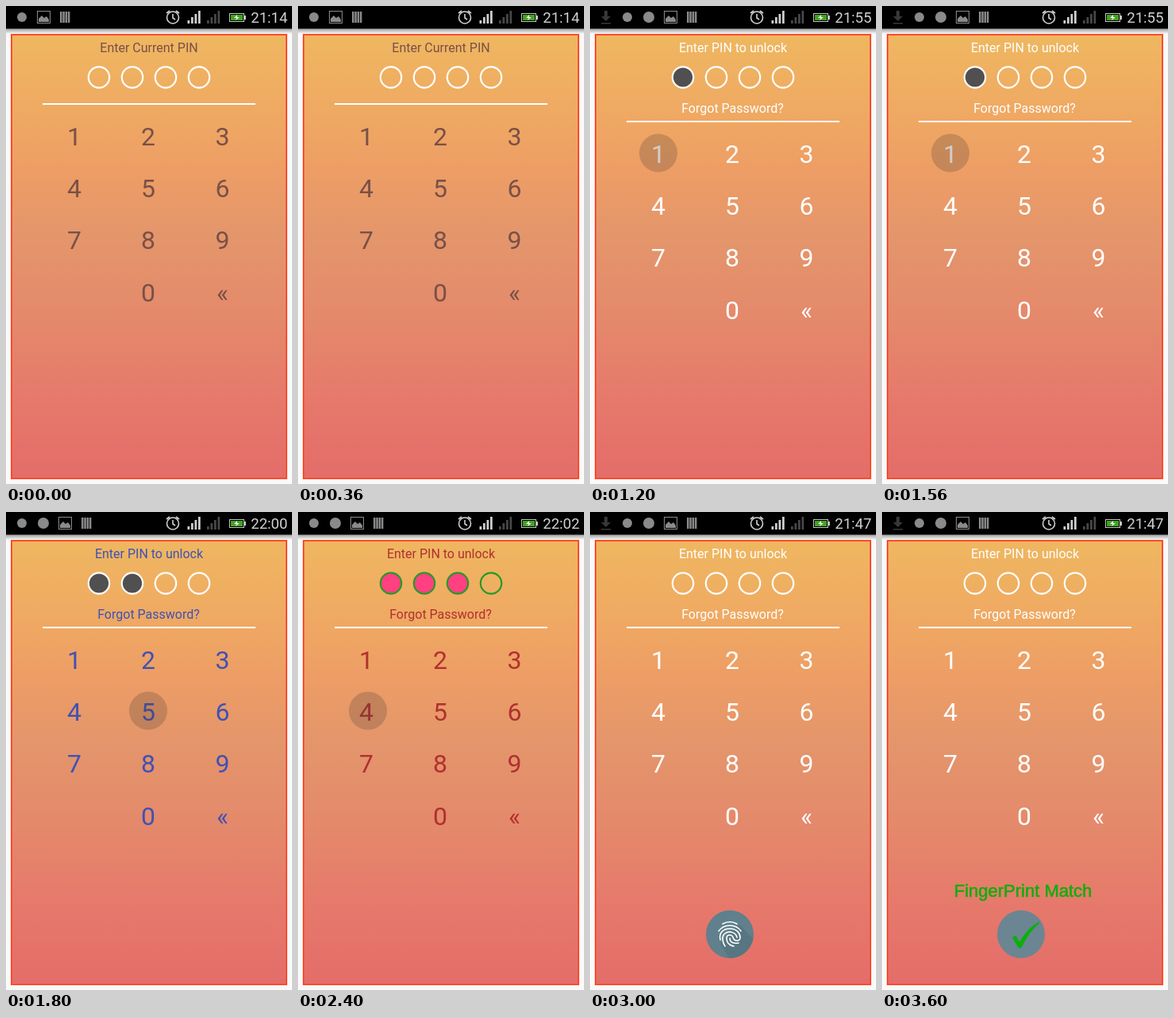
These frames come from a looping animation (360x600 px, 4.2 s). An HTML page with a canvas:

```html
<!DOCTYPE html>
<html lang="en">
<head>
<meta charset="utf-8">
<title>PIN lock screen</title>
<style>
html, body { margin: 0; width: 100%; height: 100%; overflow: hidden; background: #fafafa; }
canvas { display: block; width: 360px; height: 600px; }
</style>
</head>
<body>
<canvas id="stage" width="360" height="600"></canvas>
<script>
const ctx = document.getElementById('stage').getContext('2d');
const HOLD = 600;
const GREY = '#8a8a8a', LIGHT = '#d0d0d0';
const COLUMNS = [86, 179, 272.5];
const SHORT_TRAY = ['usb', 'photo', 'stripes'];
const MEDIUM_TRAY = ['usb', 'social', 'photo', 'stripes'];
const FULL_TRAY = ['download', ...MEDIUM_TRAY];

const base = {
  clock: '21:47', tray: FULL_TRAY, title: 'Enter PIN to unlock', forgot: true,
  ink: '#ffffff', ring: '#ffffff', fill: '#505050', entered: 0
};
const screens = [
  { ...base, clock: '21:14', tray: SHORT_TRAY, title: 'Enter Current PIN', forgot: false, ink: '#795047' },
  base,
  { ...base, clock: '21:55', entered: 1, press: [86, 184.5] },
  { ...base, clock: '22:00', tray: MEDIUM_TRAY, entered: 2, ink: '#3f51b5', press: [179, 249.5] },
  { ...base, clock: '22:02', tray: MEDIUM_TRAY, entered: 3, ink: '#b03030', ring: '#269a26', fill: '#ff4081', press: [88, 249.5] },
  { ...base, sensor: 'scan' },
  { ...base, sensor: 'match' }
];

function rect(x, y, w, h, color) {
  ctx.fillStyle = color;
  ctx.fillRect(x, y, w, h);
}

function disc(x, y, r, color) {
  ctx.beginPath();
  ctx.arc(x, y, r, 0, Math.PI * 2);
  ctx.fillStyle = color;
  ctx.fill();
}

function line(path, color, width) {
  ctx.strokeStyle = color;
  ctx.lineWidth = width;
  ctx.stroke(new Path2D(path));
}

function shape(path, color) {
  ctx.fillStyle = color;
  ctx.fill(new Path2D(path));
}

function label(text, x, y, size, color, align = 'center', family = 'Roboto, sans-serif') {
  ctx.font = `${size}px ${family}`;
  ctx.textAlign = align;
  ctx.fillStyle = color;
  ctx.fillText(text, x, y);
}

// Tray icons are drawn around their own centre.
const icons = {
  download() {
    shape('M-2 -8H2V-1H6L0 5L-6 -1H-2Z', '#383838');
    rect(-6, 7, 12, 1.5, '#383838');
  },
  usb() { disc(0, 0, 6, GREY); },
  social() { disc(0, 0, 7, GREY); },
  photo() {
    ctx.strokeStyle = GREY;
    ctx.lineWidth = 1;
    ctx.strokeRect(-7.5, -7.5, 16, 15);
    shape('M-6 6V2L-2 -2L1 1L4 -1L7 3V6Z', GREY);
  },
  stripes() {
    for (let i = 0; i < 4; i++) rect(-6 + i * 3.3, -7, 2.5, 14, GREY);
  }
};

function drawSignal(x, level) {
  for (let i = 0; i < 4; i++) {
    const h = 4 + i * 4;
    rect(x + i * 4.5, 22 - h, 2.7, h, i < level ? LIGHT : '#484848');
  }
}

function drawStatus({ tray, clock }) {
  const shadow = ctx.createLinearGradient(0, 28, 0, 35);
  shadow.addColorStop(0, '#999');
  shadow.addColorStop(1, '#fafafa');
  rect(0, 28, 360, 7, shadow);
  rect(0, 0, 360, 28.5, '#000');

  tray.forEach((name, i) => {
    ctx.save();
    ctx.translate(20 + i * 27, 14);
    icons[name]();
    ctx.restore();
  });

  line('M217.5 14.5A7.5 7.5 0 1 1 202.5 14.5A7.5 7.5 0 1 1 217.5 14.5M210 10V15L213 17M202 9L206 6M218 9L214 6', LIGHT, 1.6);
  drawSignal(228.5, 4);
  drawSignal(253, 0);

  ctx.strokeStyle = '#c4c4c4';
  ctx.lineWidth = 1;
  ctx.strokeRect(281.5, 9.5, 18, 10);
  rect(300, 12, 2, 5, '#c4c4c4');
  rect(283, 11, 15, 7, '#41a51f');
  shape('M291 11L287 15H290L289 18L294 14H291Z', '#eee');
  label(clock, 354.5, 21, 18.6, LIGHT, 'right');
}

function drawPanel() {
  const g = ctx.createLinearGradient(0, 36, 0, 593);
  [[0, '#efb760'], [0.2, '#efa763'], [0.31, '#ed9d65'], [0.45, '#e4966b'],
   [0.64, '#e4896b'], [0.82, '#e6796b'], [1, '#e46d69']]
    .forEach(([at, color]) => g.addColorStop(at, color));
  rect(6, 35, 348, 559, '#ff4b2b');
  rect(8, 37, 344, 555, g);
}

function drawKeypad({ title, forgot, ink, ring, fill, entered, press }) {
  const shift = forgot ? 22 : 0;
  label(title, 180, 58, 16, ink);
  for (let i = 0; i < 4; i++) {
    disc(117 + i * 42, 89.5, 13.2, i < entered ? fill : 'transparent');
    ctx.strokeStyle = ring;
    ctx.lineWidth = 2.2;
    ctx.stroke();
  }
  if (forgot) label('Forgot Password?', 179.5, 134, 16, ink);
  rect(46, 122 + shift, 268, 2, '#fff');

  [...'123456789 0«'].forEach((key, i) => {
    label(key, COLUMNS[i % 3], 175 + shift + Math.floor(i / 3) * 65.2, 32, ink);
  });
  if (press) disc(...press, 24, 'rgba(75, 62, 55, 0.25)');
}

function drawScan() {
  disc(176, 530, 30, '#5f808c');
  ctx.save();
  ctx.clip();
  shape('M188 518L215 545V575H185L164 542Z', '#587682');
  ctx.restore();
  ctx.lineCap = 'round';
  line('M167 517Q176 512 185 517' +
    'M162 526Q167 519 176 519Q185 519 190 526' +
    'M164 537C162 529 167 523 176 523C185 523 189 529 189 534Q189 538 185 538Q181 538 180 534Q179 531 176 531Q172 531 172 535C172 540 175 544 181 545' +
    'M170 545C167 541 166 534 168 531Q171 527 176 527Q184 528 185 534' +
    'M176 535C176 540 180 542 187 541', '#fff', 1.6);
  ctx.lineCap = 'butt';
}

function drawMatch() {
  const green = '#0ab00a';
  label('FingerPrint Match', 177.5, 483, 22, green, 'center', '"Liberation Sans", Arial, sans-serif');
  ctx.strokeStyle = green;
  ctx.lineWidth = 0.5;
  ctx.strokeText('FingerPrint Match', 177.5, 483);
  disc(175, 530, 30, '#6c8592');
  shape('M164 534Q168 530 170 534L173 540Q183 522 198 514L198 516Q185 527 176 546Q173 549 171 546Z', green);
}

function draw(now) {
  const screen = screens[Math.floor(now / HOLD) % screens.length];
  rect(0, 0, 360, 600, '#fafafa');
  drawStatus(screen);
  drawPanel();
  drawKeypad(screen);
  if (screen.sensor === 'scan') drawScan();
  if (screen.sensor === 'match') drawMatch();
}

const start = performance.now();
function tick() {
  draw(performance.now() - start);
  requestAnimationFrame(tick);
}
tick();
</script>
</body>
</html>
```
